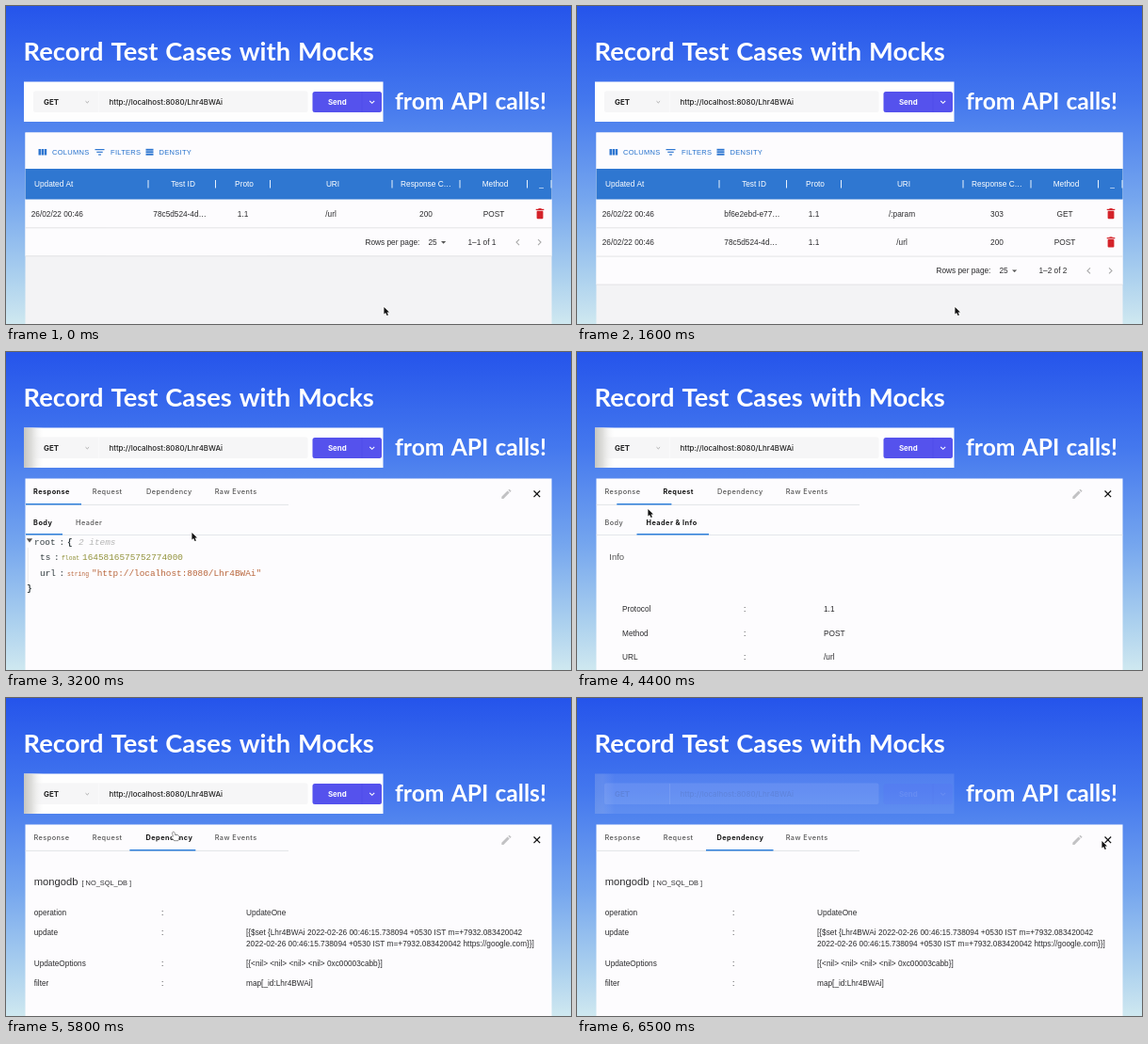
An HTML page with a canvas for the animation above (6.6 s loop, 600 by 338 pixels).

```html
<!DOCTYPE html>
<html lang="en">
<head>
<meta charset="utf-8">
<title>Record Test Cases</title>
<style>
html, body { margin: 0; width: 100%; height: 100%; overflow: hidden; background: #2856ec; }
canvas { display: block; width: 600px; height: 338px; }
</style>
</head>
<body>
<canvas id="stage"></canvas>
<script>
const W = 600, H = 338, LOOP = 6600;
const canvas = document.getElementById('stage');
const c = canvas.getContext('2d');
const dpr = window.devicePixelRatio || 1;
canvas.width = W * dpr;
canvas.height = H * dpr;

const SANS = '"Liberation Sans", Arial, sans-serif';
const MONO = '"Liberation Mono", "Courier New", monospace';
const INTER = 'Inter, sans-serif';
const TITLE = 'Lato, sans-serif';
const INK = '#2b2b2d', BLUE = '#2f77d1', ACCENT = '#2f80dc', CARD = '#fdfcfe';

// Cursor path: time, x, y
const path = [
  [0, 401, 320], [2000, 401, 320], [2550, 397, 258], [2800, 397, 257],
  [3200, 197, 192], [3500, 190, 188], [4250, 106, 148], [4400, 75, 167],
  [4700, 98, 181], [5100, 98, 181], [5600, 175, 142], [5900, 176, 142],
  [6450, 557, 152], [LOOP, 557, 152]
];
const CANCEL = [400, 1300], ROW_IN = 600, OPEN = 2800, REQUEST = 4300, DEPEND = 5600;

const clamp = v => Math.max(0, Math.min(1, v));
const ease = v => v * v * (3 - 2 * v);
const mix = (a, b, k) => a + (b - a) * k;

function rect(x, y, w, h, fill, r = 0) {
  c.fillStyle = fill;
  c.beginPath();
  c.roundRect(x, y, w, h, r);
  c.fill();
}

function poly(points, fill) {
  c.beginPath();
  points.forEach(([x, y]) => c.lineTo(x, y));
  c.closePath();
  c.fillStyle = fill;
  c.fill();
}

function line(points, color, width = 1) {
  c.beginPath();
  points.forEach(([x, y], i) => i ? c.lineTo(x, y) : c.moveTo(x, y));
  c.strokeStyle = color;
  c.lineWidth = width;
  c.stroke();
}

function text(s, x, y, { size = 8.28, font = SANS, style = '', color = INK, align = 'left', gap = 0, wordGap = 0 } = {}) {
  c.font = `${style} ${size}px ${font}`;
  c.letterSpacing = gap + 'px';
  c.wordSpacing = wordGap + 'px';
  c.textAlign = align;
  c.fillStyle = color;
  c.fillText(s, x, y);
}

function backdrop() {
  const g = c.createLinearGradient(0, 0, 0, H);
  [[0, '#2554eb'], [.3, '#4478ee'], [.6, '#74a5ee'], [.85, '#abd0ee'], [1, '#cfe8f0']]
    .forEach(([p, col]) => g.addColorStop(p, col));
  c.fillStyle = g;
  c.fillRect(0, 0, W, H);
  const style = { font: TITLE, style: 'bold', color: '#fff', wordGap: 1.3 };
  text('Record Test Cases with Mocks', 18.5, 57.7, { ...style, size: 27.3 });
  text('from API calls!', 413, 110, { ...style, size: 24.6 });
}

function requestBar(t) {
  const busy = t >= CANCEL[0] && t < CANCEL[1];
  c.save();
  c.globalAlpha = clamp(1 - (t - 6100) / 445);
  rect(19, 80.5, 381.5, 42.5, '#fefefe');
  rect(29, 90.5, 291.5, 22.5, '#f6f6f7', 2);
  line([[98.5, 91], [98.5, 113]], '#f9f9fa');
  if (t >= 2000) {
    const g = c.createLinearGradient(19, 0, 40, 0);
    g.addColorStop(0, '#c6c6c2');
    g.addColorStop(.4, '#dededc');
    g.addColorStop(1, 'rgba(250,250,250,0)');
    c.fillStyle = g;
    c.fillRect(19, 80.5, 21, 42.5);
  }
  text('GET', 40, 104.6, { size: 7.9, font: INTER, style: '700', color: '#222' });
  line([[84.5, 101.2], [86.3, 102.9], [88.1, 101.2]], '#999', .8);
  text('http://localhost:8080/Lhr4BWAi', 109.5, 104.6, { size: 7.9, font: INTER, style: '500', color: '#222' });
  rect(325.5, 91, 73.5, 22, '#5552ed', 2.5);
  if (busy) rect(325.5, 91, 52.5, 22, '#4238dc', [2.5, 0, 0, 2.5]);
  line([[378, 91], [378, 113]], '#504cea', .6);
  text(busy ? 'Cancel' : 'Send', 351.8, 104.6, { size: 7.9, font: INTER, style: '700', color: '#fff', align: 'center' });
  line([[386.2, 100.8], [388.7, 103.3], [391.2, 100.8]], '#fff', 1.1);
  c.restore();
}

function toolbar() {
  for (let i = 0; i < 3; i++) {
    rect(34.5 + i * 3.1, 152, 2.5, 6.5, BLUE);
    rect(94.5 + i * 1.8, 152 + i * 2.7, 10 - i * 3.6, 1.2, BLUE);
    rect(148.5, 151.8 + i * 2.5, 8, 1.9, BLUE);
  }
  const style = { size: 7.5, gap: .3, color: '#2470cc' };
  text('COLUMNS', 49, 158, style);
  text('FILTERS', 111, 158, style);
  text('DENSITY', 162.5, 158, style);
}

function trash(x, y) {
  rect(x - 3.4, y - 3, 6.8, 8.4, '#d4232a', 1);
  rect(x - 4.3, y - 5, 8.6, 1.3, '#d4232a');
  rect(x - 1.6, y - 5.7, 3.2, 1, '#d4232a');
}

function tableRow(y, [id, uri, code, method], hover) {
  if (hover) rect(20.5, y, 559, 30.5, '#f3f3f4');
  line([[20.5, y + 30.3], [579.5, y + 30.3]], '#dedee0', .8);
  const base = y + 18.2, mid = { align: 'center' };
  text('26/02/22 00:46', 26.7, base);
  text(id, 156.3, base);
  text('1.1', 251.5, base, mid);
  text(uri, 345, base, mid);
  text(code, 446, base, mid);
  text(method, 518, base, mid);
  trash(567, y + 15.3);
}

function chevron(x, y, dir) {
  line([[x - 1.5 * dir, y - 3], [x + 1.5 * dir, y], [x - 1.5 * dir, y + 3]], '#aaa', 1.1);
}

function listView(t, cursor) {
  const rows = [['78c5d524-4d…', '/url', '200', 'POST']];
  if (t >= ROW_IN) rows.unshift(['bf6e2ebd-e77…', '/:param', '303', 'GET']);
  const foot = 205.5 + rows.length * 30.3;
  rect(20.5, 134.5, 559, 203.5, '#f3f3f5');
  rect(20.5, 134.5, 559, foot + 30 - 134.5, CARD);
  toolbar();

  rect(20.5, 173, 559, 32.5, BLUE);
  const head = { color: '#fff', align: 'center' };
  text('Updated At', 30, 192, { color: '#fff' });
  [['Test ID', 188], ['Proto', 253], ['URI', 347], ['Response C…', 446], ['Method', 519.5], ['_', 568.5]]
    .forEach(([s, x]) => text(s, x, 192, head));
  [151, 222.5, 280.5, 410, 482, 553.5, 579].forEach(x => rect(x - .5, 185, 1, 8.5, '#e8f1fc'));

  rows.forEach((row, i) => {
    const y = 205.5 + i * 30.3;
    tableRow(y, row, cursor.y >= y && cursor.y < y + 30.3);
  });

  const base = foot + 18.3, n = rows.length;
  text('Rows per page:', 381.5, base);
  text('25', 448.5, base);
  poly([[462, base - 4], [467.2, base - 4], [464.6, base - 1.3]], '#555');
  text(`1–${n} of ${n}`, 490.5, base);
  chevron(543.5, base - 3, -1);
  chevron(566.5, base - 3, 1);
  line([[20.5, foot + 30], [579.5, foot + 30]], '#dedee0', .8);
}

const tabs = [
  { name: 'Response', x: 29.5, from: 21, to: 80 },
  { name: 'Request', x: 91.8, from: 80.5, to: 137 },
  { name: 'Dependency', x: 149, from: 137, to: 208.5 },
  { name: 'Raw Events', x: 221.7, from: 211, to: 278 }
];

function tabText(s, x, y, active) {
  text(s, x - (active ? .4 : 0), y, {
    size: 7.3, gap: .45, font: INTER, style: active ? '700' : '500', color: active ? '#151515' : '#555'
  });
}

function slider(t, index) {
  if (!index) return tabs[0];
  const start = index === 1 ? REQUEST : DEPEND;
  const a = tabs[index - 1], b = tabs[index];
  const k = ease(clamp((t - start) / 250));
  return { from: mix(a.from, b.from, k), to: mix(a.to, b.to, k) };
}

function subTabs(names, active) {
  line([[20.5, 194.5], [579.5, 194.5]], '#dfe2e6', .8);
  names.forEach((s, i) => tabText(s, i ? 74 : 29.5, 183.6, i === active));
  if (active) rect(63.5, 193, 76.5, 1.6, ACCENT);
  else rect(21, 193, 39, 1.6, ACCENT);
}

function responseBody() {
  subTabs(['Body', 'Header'], 0);
  const code = { size: 9.4, font: MONO, color: '#333d41' };
  const small = { ...code, size: 6.4 };
  const green = '#92923a', orange = '#b9663c';
  poly([[21.8, 198.3], [28.2, 198.3], [25, 202.6]], '#555');
  text('root', 30, 205.2, code);
  text(':', 56.5, 205.2, code);
  text('{', 65, 205.2, { ...code, style: 'bold' });
  text('2 items', 77, 205.2, { ...code, style: 'italic', color: '#b5b5b5' });
  line([[23.3, 208], [23.3, 245]], '#e6e6e8', .8);
  text('ts', 36, 221, code);
  text(':', 51, 221, code);
  text('float', 59, 221, { ...small, color: green });
  text('1645816575752774000', 81, 221, { ...code, color: green });
  text('url', 36, 238.2, code);
  text(':', 56.5, 238.2, code);
  text('string', 65, 238.2, { ...small, color: orange });
  text('"http://localhost:8080/Lhr4BWAi"', 91, 238.2, { ...code, color: orange });
  text('}', 22, 254.2, { ...code, style: 'bold' });
}

function requestInfo() {
  subTabs(['Body', 'Header & Info'], 1);
  text('Info', 34.3, 220.5, { size: 9.5, color: '#555' });
  [['Protocol', '1.1'], ['Method', 'POST'], ['URL', '/url']].forEach(([key, value], i) => {
    const y = 276 + i * 25.5;
    text(key, 48, y);
    text(':', 177, y);
    text(value, 262, y);
  });
}

function dependency() {
  text('mongodb', 29.7, 199, { size: 11.2 });
  text('[ NO_SQL_DB ]', 80.5, 199, { size: 7.4 });
  const stamp = '2022-02-26 00:46:15.738094 +0530 IST m=+7932.083420042';
  [
    [231.3, 'operation', 'UpdateOne'],
    [252, 'update', '[{$set {Lhr4BWAi ' + stamp],
    [284.8, 'UpdateOptions', '[{<nil> <nil> <nil> <nil> 0xc00003cabb}]'],
    [305.6, 'filter', 'map[_id:Lhr4BWAi]']
  ].forEach(([y, key, value]) => {
    text(key, 29.7, y);
    text(':', 165, y);
    text(value, 255, y);
  });
  text(stamp + ' https://google.com}}]', 255, 263.8);
}

function detailView(t) {
  const index = t >= DEPEND ? 2 : t >= REQUEST ? 1 : 0;
  rect(20.5, 134.5, 559, 203.5, CARD);
  line([[20.5, 162.4], [300, 162.4]], '#dcdfe3', .8);
  tabs.forEach((tab, i) => tabText(tab.name, tab.x, 151.3, i === index));
  const s = slider(t, index);
  rect(s.from, 161, s.to - s.from, 1.6, ACCENT);

  poly([[526.3, 153.8], [532.6, 147.5], [534.7, 149.6], [528.4, 155.9], [526.3, 155.9]], '#c2c2c4');
  poly([[533.3, 146.8], [534.5, 145.7], [536.6, 147.8], [535.4, 148.9]], '#c2c2c4');
  line([[560.5, 147.5], [567.1, 154.1]], '#111', 1.25);
  line([[567.1, 147.5], [560.5, 154.1]], '#111', 1.25);
  [responseBody, requestInfo, dependency][index]();
}

function cursorAt(t) {
  const i = path.findIndex((p, n) => n && t <= p[0]);
  const [t0, x0, y0] = path[i - 1], [t1, x1, y1] = path[i];
  const k = ease((t - t0) / (t1 - t0));
  return { x: mix(x0, x1, k), y: mix(y0, y1, k) };
}

function drawCursor({ x, y }, hand) {
  c.save();
  c.translate(x, y);
  c.lineJoin = 'round';
  const shape = new Path2D(hand
    ? 'M1.2 .8Q2.2-.5 3 .8L3.4 3.4 7 4.2Q8.4 4.7 8 6.2L7 9.6H2.8L-.2 5.9Q-.2 4.6 1.8 5.6Z'
    : 'M.4 0V7.6L2.2 6 3.5 9 4.9 8.4 3.6 5.5H6Z');
  c.strokeStyle = hand ? '#222' : '#fff';
  c.lineWidth = hand ? .9 : 1.3;
  c.fillStyle = hand ? '#fff' : '#111';
  c.stroke(shape);
  c.fill(shape);
  c.restore();
}

function draw(t) {
  const cursor = cursorAt(t);
  c.setTransform(dpr, 0, 0, dpr, 0, 0);
  backdrop();
  requestBar(t);
  const open = t >= OPEN;
  if (open) detailView(t);
  else listView(t, cursor);
  const hand = open && cursor.y > 135 && cursor.y < 160 && cursor.x < 278;
  drawCursor(cursor, hand);
}

const begin = performance.now();
function tick() {
  draw((performance.now() - begin) % LOOP);
  requestAnimationFrame(tick);
}
tick();
</script>
</body>
</html>
```
